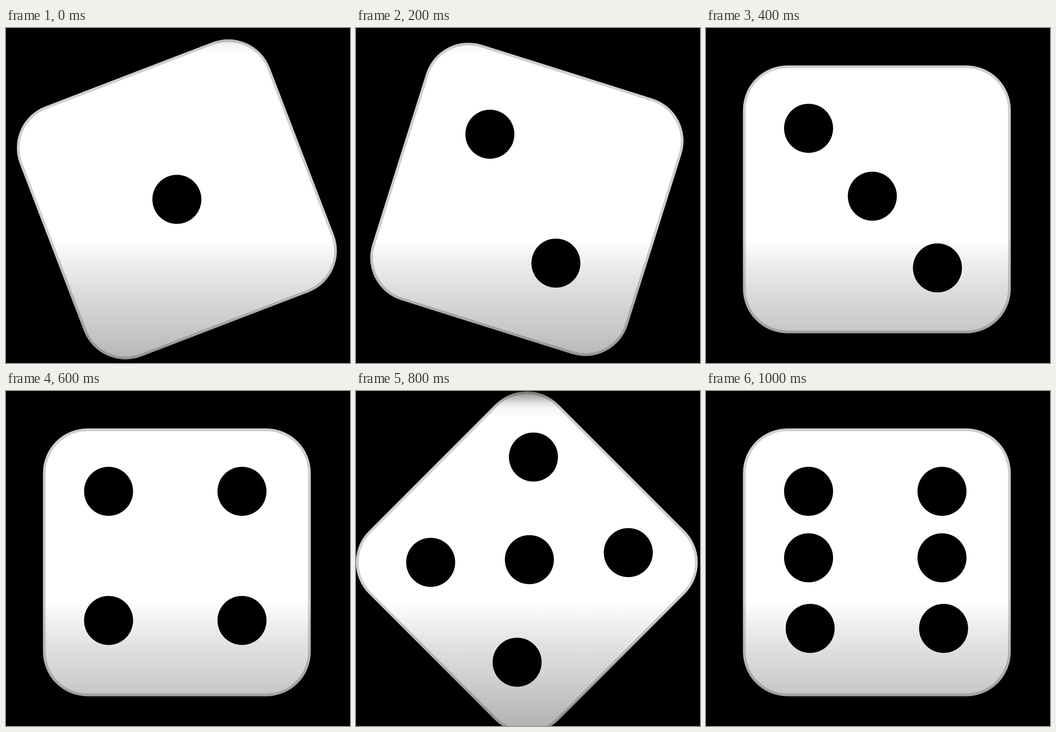
Write an HTML page that moves like this. It is 758 by 738 pixels and loops after 1200 ms.

```html
<!DOCTYPE html>
<html lang="en">
<head>
<meta charset="utf-8">
<title>Rolling die</title>
<style>
  html, body { margin: 0; width: 100%; height: 100%; overflow: hidden; background: #000; }
  svg { display: block; width: 100%; height: 100%; overflow: hidden; }
  .roll { animation: roll 1.2s steps(6) infinite; }
  @keyframes roll { to { transform: translateX(-4548px); } }
  .edge { fill: none; stroke: #000; stroke-width: 6px; stroke-opacity: .19; }
</style>
</head>
<body>
<svg viewBox="0 0 758 738">
  <defs>
    <!-- The light stays level while the die turns beneath it -->
    <linearGradient id="light" gradientUnits="userSpaceOnUse" x1="0" y1="0" x2="0" y2="738">
      <stop offset="0" stop-color="#8c8c8c"/>
      <stop offset=".014" stop-color="#acacac"/>
      <stop offset=".035" stop-color="#e0e0e0"/>
      <stop offset=".05" stop-color="#f4f4f4"/>
      <stop offset=".08" stop-color="#fff"/>
      <stop offset=".627" stop-color="#fff"/>
      <stop offset=".76" stop-color="#e1e1e1"/>
      <stop offset=".867" stop-color="#cecece"/>
      <stop offset="1" stop-color="#b4b4b4"/>
    </linearGradient>
    <linearGradient id="light-left" href="#light" gradientTransform="rotate(21 376.5 377.5)"/>
    <linearGradient id="light-right" href="#light" gradientTransform="rotate(-17.5 376.5 377.5)"/>
    <linearGradient id="light-tip" href="#light" gradientTransform="rotate(-45 376.5 377.5)"/>
    <g id="body">
      <rect x="81.5" y="82.5" width="590" height="590" rx="98"/>
      <rect class="edge" x="84.5" y="85.5" width="584" height="584" rx="95"/>
    </g>
    <circle id="dot" r="54"/>
  </defs>

  <g class="roll">
    <g>
      <use href="#body" fill="url(#light-left)" transform="rotate(-21 376.5 377.5)"/>
      <use href="#dot" x="376.5" y="377.5"/>
    </g>
    <g transform="translate(758)">
      <use href="#body" fill="url(#light-right)" transform="rotate(17.5 376.5 377.5)"/>
      <use href="#dot" x="295" y="234"/>
      <use href="#dot" x="440.5" y="518"/>
    </g>
    <g transform="translate(1516)">
      <use href="#body" fill="url(#light)"/>
      <use href="#dot" x="226" y="221"/>
      <use href="#dot" x="366.5" y="370.5"/>
      <use href="#dot" x="510" y="528.5"/>
    </g>
    <g transform="translate(2274)">
      <use href="#body" fill="url(#light)"/>
      <use href="#dot" x="226" y="221"/>
      <use href="#dot" x="520" y="221"/>
      <use href="#dot" x="226" y="505.5"/>
      <use href="#dot" x="520" y="505.5"/>
    </g>
    <g transform="translate(3032)">
      <use href="#body" fill="url(#light-tip)" transform="rotate(45 376.5 377.5)"/>
      <use href="#dot" x="391" y="145.5"/>
      <use href="#dot" x="164.5" y="377.5"/>
      <use href="#dot" x="382" y="371.5"/>
      <use href="#dot" x="600" y="356"/>
      <use href="#dot" x="355" y="597.5"/>
    </g>
    <g transform="translate(3790)">
      <use href="#body" fill="url(#light)"/>
      <use href="#dot" x="226" y="221"/>
      <use href="#dot" x="520" y="221"/>
      <use href="#dot" x="226" y="367.5"/>
      <use href="#dot" x="520" y="367.5"/>
      <use href="#dot" x="229.5" y="523"/>
      <use href="#dot" x="523.5" y="523"/>
    </g>
  </g>
</svg>
</body>
</html>
```
